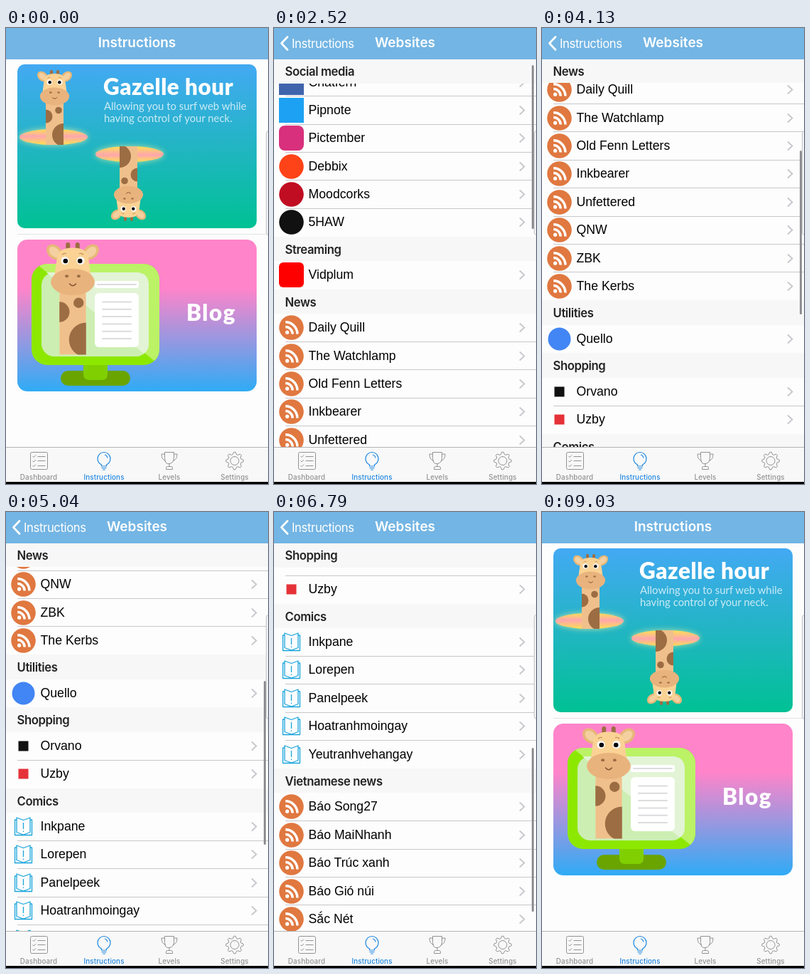
An HTML page that plays this animation: 369 by 640 pixels, repeating every 9.1 s.

```html
<!DOCTYPE html>
<html lang="en">
<head>
<meta charset="utf-8">
<style>
html, body { margin: 0; width: 100%; height: 100%; overflow: hidden; background: #fdfdfd; }
#stage { position: absolute; left: 0; top: 0; width: 369px; height: 640px; overflow: hidden; font-family: Inter, sans-serif; }
#stage > *, #page > *, #nav > * { position: absolute; }
svg { display: block; }
#home, #dim { left: 0; top: 0; width: 369px; height: 640px; }
#dim { background: #000; }
#page { left: 0; top: 43px; width: 369px; height: 545px; background: #fdfdfd; }
#list { inset: 0; overflow: hidden; isolation: isolate; }
h2 { position: sticky; top: 0; z-index: 1; margin: 0; padding-left: 15.5px; height: 34.5px; background: #f7f7f7;
  font: 600 16.7px/37px Inter, sans-serif; letter-spacing: -.4px; color: #222; }
.row { position: relative; height: 39.4px; padding-left: 48.5px; color: #000;
  font: 17.7px/39.4px "Liberation Sans", Arial, sans-serif; white-space: nowrap; }
.row:not(:last-child)::after { content: ""; position: absolute; left: 16px; right: 0; bottom: -.4px; height: 1px; background: #c8c7cc; }
.row svg { position: absolute; top: 2px; }
.icon { left: 7px; }
.more { left: 340px; }
#foot { height: 56px; overflow: hidden; }
#foot div { margin: 15px 52px 0; height: 33px; border-radius: 8px; background: #5cabe3; color: #fff; text-align: center;
  font: 600 16.7px/33px Inter, sans-serif; letter-spacing: -.2px; }
#bar { z-index: 2; left: 363px; width: 3px; height: 230px; border-radius: 2px; background: #8f8f93; }
#nav { left: 0; top: 0; width: 369px; height: 44px; background: #73b5e4; color: #fff; }
.title { left: 0; width: 369px; text-align: center; font: 600 19px/41px Inter, sans-serif; }
#back { left: 25px; font: 16.7px/44px Inter, sans-serif; letter-spacing: -.4px; }
#edge { left: 366px; top: 144px; width: 10px; height: 145px; border: 1px solid #c4c4c8; border-radius: 4px; background: #f4f4f5; }
#tabs { left: 0; top: 588px; }
#tabs text { font: 500 9.8px Inter, sans-serif; letter-spacing: .15px; text-anchor: middle; stroke: none; }
#foil { left: 0; top: 637px; width: 369px; height: 3px; background: #000; }
.heavy { font: 900 31.5px Lato, sans-serif; letter-spacing: .5px; fill: #fff; }
.sub { font: 14.9px Lato, sans-serif; fill: #fff; opacity: .75; }
</style>
</head>
<body>
<div id="stage">
  <svg id="home" viewBox="0 0 369 640">
    <defs>
      <linearGradient id="sea" x2="0" y2="1"><stop stop-color="#43a9f3"/><stop offset="1" stop-color="#00c194"/></linearGradient>
      <linearGradient id="candy" x2="0" y2="1"><stop offset=".32" stop-color="#ff84ca"/><stop offset="1" stop-color="#2fabf6"/></linearGradient>
      <linearGradient id="glow" x2="0" y2="1"><stop stop-color="#ffdd55"/><stop offset=".45" stop-color="#ffa6ae"/><stop offset="1" stop-color="#ffe052"/></linearGradient>
      <clipPath id="neck"><path d="M-12.5 35h25v70h-25z"/></clipPath>
      <clipPath id="shell"><rect x="36" y="331" width="180" height="142" rx="22"/></clipPath>
      <g id="giraffe">
        <g clip-path="url(#neck)">
          <path fill="#f0c08c" d="M-12.5 35h25v70h-25z"/>
          <g fill="#9c6d43"><circle cx="12.5" cy="91" r="16"/><circle cx="-12.5" cy="65" r="9.5"/><circle cx="5.5" cy="56.5" r="4.8"/></g>
        </g>
        <path stroke="#9c6d43" stroke-width="4" stroke-linecap="round" d="M-4.5 2v8M4.5 2v8"/>
        <g id="ear"><ellipse cx="-17" cy="9" rx="8.5" ry="6.3" transform="rotate(42 -17 9)" fill="#e6b878"/><ellipse cx="-17" cy="9" rx="6" ry="4" transform="rotate(42 -17 9)" fill="#f4cfa0"/></g>
        <use href="#ear" transform="scale(-1 1)"/>
        <path fill="#fad294" d="M-15 16Q-15 5 0 5T15 16L18 38H-18Z"/>
        <circle cx="-7.3" cy="17" r="3.7" fill="#fff"/><circle cx="7.3" cy="17" r="3.7" fill="#fff"/>
        <circle cx="-6.8" cy="17.3" r="2.2"/><circle cx="6.8" cy="17.3" r="2.2"/>
        <path fill="none" stroke="#b98a55" stroke-width=".8" d="M-10 11.5q2-2 4-1M10 11.5q-2-2-4-1"/>
        <ellipse cy="37" rx="20.6" ry="12.4" fill="#e9b37d"/>
        <g fill="#9c6d43"><ellipse cx="-5.6" cy="31.5" rx="1.7" ry="1.3"/><ellipse cx="5.6" cy="31.5" rx="1.7" ry="1.3"/></g>
        <path fill="none" stroke="#80552f" stroke-width="1" stroke-linecap="round" d="M-3 38.7Q0 42.2 3 38.7"/>
      </g>
      <g id="portal">
        <ellipse cx="67" cy="153" rx="48" ry="11" fill="url(#glow)" style="filter:drop-shadow(0 0 4px #fff3a0b0)"/>
        <use href="#giraffe" x="68.5" y="59"/>
      </g>
    </defs>
    <rect width="369" height="640" fill="#fdfdfd"/>
    <path stroke="#e2e2e4" d="M16 289.5H369"/>
    <rect x="16" y="51" width="337" height="230" rx="10" fill="url(#sea)"/>
    <use href="#portal"/>
    <use href="#portal" transform="rotate(180 120.5 165)"/>
    <text class="heavy" x="137" y="94">Gazelle hour</text>
    <text class="sub" x="138" y="115">Allowing you to surf web while</text>
    <text class="sub" x="138" y="132">having control of your neck.</text>
    <rect x="16" y="297" width="337" height="213" rx="14" fill="url(#candy)"/>
    <rect x="77" y="481" width="98" height="21" rx="10.5" fill="#6aa400"/>
    <path fill="#80cf00" d="M109 465h34v21q0 8-8 8h-18q-8 0-8-8z"/>
    <g clip-path="url(#shell)">
      <path fill="#8de800" d="M36 331h180v142H36z"/>
      <path fill="#bbf266" d="M43 331H216V473z"/>
    </g>
    <rect x="50" y="343" width="151" height="118" rx="18" fill="#cdeeb2"/>
    <path fill="#e2f4d5" d="M57 343H183Q201 343 201 361V443Q201 453 194 457Z"/>
    <g fill="#fff"><rect x="125" y="355" width="62" height="10" rx="3"/><rect x="125" y="372" width="62" height="76" rx="6"/></g>
    <path id="lines" stroke="#dcdcdf" stroke-width="2" stroke-linecap="round"/>
    <use href="#giraffe" transform="translate(94 301) scale(1.5)"/>
    <text class="heavy" x="254" y="411" style="letter-spacing:1.5px">Blog</text>
  </svg>
  <div id="dim"></div>
  <div id="page"><div id="list"></div><div id="bar"></div></div>
  <div id="nav">
    <div class="title" id="first">Instructions</div>
    <div class="title" id="second">Websites</div>
    <svg id="arrow" width="25" height="43"><path d="M19 12.5L10.5 21.5L19 30.5" fill="none" stroke="#fff" stroke-width="2.8" stroke-linecap="round" stroke-linejoin="round"/></svg>
    <div id="back">Instructions</div>
  </div>
  <div id="edge"></div>
  <svg id="tabs" width="369" height="49" viewBox="0 588 369 49" fill="none" stroke="#929292">
    <path fill="#f8f8f8" stroke="none" d="M0 588h369v49H0z"/>
    <path stroke="#b4b4b6" d="M0 588.5h369"/>
    <rect x="34.5" y="595.5" width="24" height="24" rx="2"/>
    <path d="M37.5 601l1.5 1.5l3-3M37.5 607.5l1.5 1.5l3-3M37.5 614l1.5 1.5l3-3M44.5 601.5h11M44.5 607.5h11M44.5 614.5h11"/>
    <path stroke="#1c86e0" stroke-width="1.2" d="M134.5 615v-2q-5.5-3-5.5-8.5a9 9 0 0 1 18 0q0 5.5-5.5 8.5v2zM134.5 617.5h7M136 620h4M139 599q3.5 1 4 4.5"/>
    <path d="M223.5 595.5h13v8q0 7-6.5 8t-6.5-8zM223.5 598h-4.5q0 8 6 9.5M236.5 598h4.5q0 8-6 9.5M230 611.5v4M225.5 619.5v-2q0-2 2-2h5q2 0 2 2v2z"/>
    <circle cx="322" cy="607.5" r="6"/>
    <path id="gear" stroke-linejoin="round"/>
    <g fill="#929292"><text x="46" y="633.5">Dashboard</text><text x="138" y="633.5" fill="#1c86e0">Instructions</text><text x="230" y="633.5">Levels</text><text x="322" y="633.5">Settings</text></g>
  </svg>
  <div id="foil"></div>
</div>
<script>
const $ = id => document.getElementById(id);
const square = (color, size = 35, r = 0) =>
  `<rect x="${17.5 - size / 2}" y="${17.5 - size / 2}" width="${size}" height="${size}" rx="${r}" fill="${color}"/>`;
const disc = (color, r = 17.3) => `<circle cx="17.5" cy="17.5" r="${r}" fill="${color}"/>`;
const feed = disc('#e07840') +
  '<circle cx="11.6" cy="24.2" r="2.6" fill="#fff"/><path fill="none" stroke="#fff" stroke-width="3.5" d="M9.2 16.5A10 10 0 0 1 19.2 26.5M9.2 9.8A16.7 16.7 0 0 1 25.9 26.5"/>';
const book = '<path fill="none" stroke="#1ba5dc" stroke-width="1.3" stroke-linejoin="round" d="M17.5 8.5L8 5V25.5L17.5 29L27 25.5V5ZM8 8H5.5V29.5H29.5V8H27M17.5 12v9M17.5 23.5v1.5"/>';
const each = (icon, names) => names.split(',').map(name => [name, icon]);

const sections = {
  'Social media': [['Chatfern', square('#4064ac')], ['Pipnote', square('#1da1f2')], ['Pictember', square('#d8307c', 35, 8)],
    ['Debbix', disc('#ff4318')], ['Moodcorks', disc('#c00d22')], ['5HAW', disc('#111')]],
  'Streaming': [['Vidplum', square('#f00', 35, 6)]],
  'News': each(feed, 'Daily Quill,The Watchlamp,Old Fenn Letters,Inkbearer,Unfettered,QNW,ZBK,The Kerbs'),
  'Utilities': [['Quello', disc('#4285f4', 16)]],
  'Shopping': [['Orvano', square('#111', 14)], ['Uzby', square('#e53238', 14)]],
  'Comics': each(book, 'Inkpane,Lorepen,Panelpeek,Hoatranhmoingay,Yeutranhvehangay'),
  'Vietnamese news': each(feed, 'Báo Song27,Báo MaiNhanh,Báo Trúc xanh,Báo Gió núi,Sắc Nét')
};
const row = ([name, icon]) => `<div class="row"><svg class="icon" width="35" height="35">${icon}</svg>${name}
  <svg class="more" width="20" height="35"><path d="M6 11.5L12.5 17.5L6 23.5" fill="none" stroke="#c7c7cc" stroke-width="1.8"/></svg></div>`;
$('list').innerHTML = Object.entries(sections)
  .map(([head, rows]) => `<section><h2>${head}</h2>${rows.map(row).join('')}</section>`).join('') +
  '<div id="foot"><div>Request more websites</div></div>';

$('lines').setAttribute('d', 'M129 360H183' + [0, 1, 2, 3, 4, 5].map(i => `M136 ${384.5 + i * 10.3}H176`).join(''));
$('gear').setAttribute('d', 'M' + Array.from({ length: 32 }, (_, i) => {
  const a = (i - 1.5) * Math.PI / 16, r = i % 4 === 1 || i % 4 === 2 ? 12.3 : 9.3;
  return `${322 + r * Math.sin(a)} ${607.5 - r * Math.cos(a)}`;
}).join('L') + 'Z');

const LOOP = 9100;
const clamp = x => Math.max(0, Math.min(1, x));
// Critically damped spring, settled after 730 ms
const spring = t => t <= 0 ? 0 : t >= 730 ? 1 : 1 - (1 + .0122 * t) * Math.exp(-.0122 * t);

// Scroll keys: time, offset, speed in px/ms
const keys = [[2200, 0, 0], [3360, 185.5, .2], [4130, 355.5, .2], [5950, 701, .16], [6230, 730, 0],
  [6300, 730, 0], [6860, 800, 0], [6930, 800, 0], [7700, 854.5, 0]];
function scrollAt(t) {
  if (t <= keys[0][0]) return 0;
  const i = keys.findIndex(k => k[0] > t);
  if (i < 0) return keys.at(-1)[1];
  const [t0, s0, v0] = keys[i - 1], [t1, s1, v1] = keys[i];
  const d = t1 - t0, u = (t - t0) / d, w = 1 - u;
  return w * w * ((1 + 2 * u) * s0 + u * d * v0) + u * u * ((1 + 2 * w) * s1 - w * d * v1);
}

function place(id, x, opacity) {
  $(id).style.transform = `translateX(${x}px)`;
  $(id).style.opacity = opacity;
}

function draw(t) {
  const p = spring(t - 525) - spring((t - 8370) * 1.12), q = 1 - p;
  const s = scrollAt(t);
  place('home', -110 * p, 1);
  $('dim').style.opacity = .1 * p;
  place('page', 369 * q, 1);
  place('first', -114 * p, clamp(1 - 1.5 * p));
  place('back', 114 * q, clamp(1.5 * p - .5));
  place('second', 184 * q, p);
  place('arrow', 0, p);
  $('list').scrollTop = s;
  $('bar').style.top = 1 + .36 * s + 'px';
  $('bar').style.opacity = clamp((t - 2200) / 100) * clamp((7910 - t) / 210);
}

let start;
function tick(now) {
  start ??= now;
  draw((now - start) % LOOP);
  requestAnimationFrame(tick);
}
draw(0);
requestAnimationFrame(tick);
</script>
</body>
</html>
```
